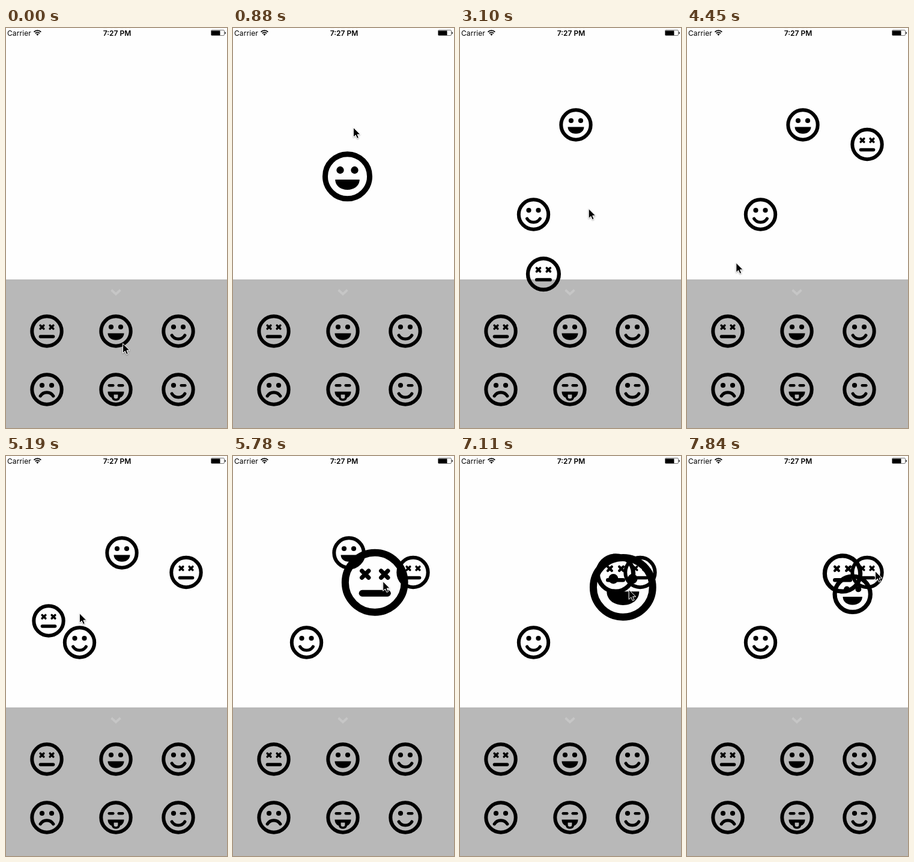
An HTML page for the animation above (8000 ms loop, 368 by 665 pixels).

```html
<!DOCTYPE html>
<html lang="en">
<head>
<meta charset="utf-8">
<title>Face tray</title>
<style>
  html, body { margin: 0; width: 100%; height: 100%; overflow: hidden; background: #fefefe; }
  svg { display: block; width: 368px; height: 665px; }
  text { font: 12px Inter, Roboto, sans-serif; }
  .line { fill: none; stroke: #000; stroke-linecap: round; stroke-linejoin: round; }
</style>
</head>
<body>
<svg viewBox="0 0 368 665">
  <defs>
    <circle id="ring" class="line" r="24.7" stroke-width="6"/>
    <circle id="dot" r="4.1" cy="-7"/>
    <path id="dash" class="line" d="M-3.3-6.8h6.6" stroke-width="4.4"/>
    <path id="cross" class="line" d="M-2.8-9.6l5.6 5.6m0-5.6l-5.6 5.6" stroke-width="3.6"/>
    <path id="curve" class="line" d="M-10.8 7C-6 15 6 15 10.8 7" stroke-width="5.2"/>
    <g id="dots"><use href="#dot" x="-8"/><use href="#dot" x="8"/></g>

    <g id="dead">
      <use href="#ring"/><use href="#cross" x="-8"/><use href="#cross" x="8"/>
      <path class="line" d="M-10.6 9h21.2" stroke-width="5.4"/>
    </g>
    <g id="grin">
      <use href="#ring"/><use href="#dots"/>
      <path d="M-13.5 3.5h27c0 6.5-5.5 11.3-13.5 11.3s-13.5-4.8-13.5-11.3z"/>
    </g>
    <g id="smile"><use href="#ring"/><use href="#dots"/><use href="#curve"/></g>
    <g id="sad">
      <use href="#ring"/><use href="#dots"/>
      <use href="#curve" transform="translate(0 17.8) scale(1 -1)"/>
    </g>
    <g id="tongue">
      <use href="#ring"/><use href="#dash" x="-8"/><use href="#dash" x="8"/>
      <path fill-rule="evenodd" d="M-13.5 3.5h27c0 5-2.5 8.5-6.5 10.3c-.6 3-3.2 5-7 5s-6.4-2-7-5c-4-1.8-6.5-5.3-6.5-10.3zM-3.4 8.5v3.5a3.4 3.2 0 0 0 6.8 0v-3.5z"/>
    </g>
    <g id="wink">
      <use href="#ring"/><use href="#dot" x="-8"/><use href="#dash" x="8"/><use href="#curve"/>
    </g>
    <filter id="shade" x="-50%" y="-50%" width="200%" height="200%">
      <feDropShadow dx="0" dy="1" stdDeviation="1" flood-opacity=".4"/>
    </filter>
  </defs>

  <rect width="368" height="665" fill="#fefefe"/>
  <text x="2" y="12.5" letter-spacing=".1">Carrier</text>
  <path class="line" style="stroke-linecap:butt" stroke-width="1.9"
        d="M46.5 6.6a8.3 8.3 0 0 1 11.8 0M48.7 8.9a5.2 5.2 0 0 1 7.4 0"/>
  <path d="M52.4 12.7l-2.1-2.2a3 3 0 0 1 4.2 0z"/>
  <text x="185" y="12.5" text-anchor="middle" style="font-weight:600">7:27 PM</text>
  <rect x="341.5" y="3.5" width="22" height="9" rx="1.5" fill="none" stroke="#777"/>
  <rect x="342" y="4.5" width="14.5" height="7.5"/>
  <path d="M364.5 6.3q1.5.4 1.5 1.9t-1.5 1.9z"/>

  <rect y="418" width="368" height="247" fill="#b8b8b8"/>
  <path d="M175.5 435.5l7.5 7 7.5-7" fill="none" stroke="#c6c6c6" stroke-width="3.8"/>
  <g id="faces"></g>
  <path id="cursor" d="M.5 .5v16l3.7-3.5 2.5 5.6 2.7-1.1-2.4-5.5h5z"
        stroke="#fff" filter="url(#shade)"/>
</svg>
<script>
const LOOP = 8000, TICK = 148.1, LAST = 53;
const rest = [194, 524], park = [313, 191];
const $ = id => document.getElementById(id);
const add = (a, b, k = 1) => a.map((v, axis) => v + b[axis] * k);

const tray = {};
['dead', 'grin', 'smile', 'sad', 'tongue', 'wink'].forEach((kind, n) => {
  tray[kind] = [[68, 183, 287][n % 3], n < 3 ? 504 : 601];
});
const kinds = ['grin', 'smile', 'dead', 'dead'];

// press and drop are ticks, grab is the pointer's offset on the face,
// to is where the face lands; ease and bow shape the hand's path.
const drags = [
  { sprite: 0, press: 2, drop: 6, grab: [7, 4], to: [193, 161], ease: 1, bow: 0 },
  { sprite: 1, press: 12, drop: 15, grab: [10, 6], to: [122.5, 310], ease: .6, bow: 0 },
  { sprite: 2, press: 19, drop: 22, grab: [0, -9], to: [300, 193.5], ease: .9, bow: 0 },
  { sprite: 3, press: 29, drop: 31, grab: [0, -11], to: [71, 274], ease: .86, bow: 12 },
  { sprite: 3, press: 34, drop: 40, grab: [-4, 7], to: [259, 195.5], ease: 1.85, bow: 5.6 },
  { sprite: 0, press: 45, drop: 48, grab: [5, -8], to: [275.7, 229.8], ease: 2.1, bow: -7 }
];

// The first drag of a sprite lifts it from the tray, a later one from where it lies.
drags.forEach((drag, n) => {
  const before = drags.slice(0, n).findLast(d => d.sprite === drag.sprite);
  drag.home = before ? before.to : tray[kinds[drag.sprite]];
  drag.peak = before ? 2 : 1.5;
  drag.size = before ? 1.2 : 1;
  drag.settle = drag.drop + 2;
});

function dragPos({ press, drop, home, to, ease, bow }, tick) {
  const k = Math.min(1, Math.max(0, (tick - press) / (drop - press)));
  const [dx, dy] = add(to, home, -1);
  const side = bow * Math.sin(Math.PI * k) / Math.hypot(dx, dy);
  return add(add(home, [dx, dy], 1 - (1 - k) ** ease), [-dy, dx], side);
}

function scaleAt(tick, { press, settle, peak, size }) {
  if (tick >= settle) return size;
  if (tick === press + 2) return 1.05;
  return tick === settle - 1 ? peak * .92 : peak;
}

// Follows the current drag, then glides to the next press.
function pointerAt(tick) {
  const now = drags.findLast(d => d.press <= tick);
  if (now && tick < now.settle) return add(dragPos(now, tick), now.grab);
  const next = drags.find(d => d.press > tick);
  const from = now ? add(now.to, now.grab) : rest;
  const to = next ? add(next.home, next.grab) : park;
  const start = now ? now.settle : 0, end = next ? next.press : LAST;
  const k = (tick - start) / (end - start);
  return add(from, add(to, from, -1), k * k * (3 - 2 * k));
}

function addFace(kind) {
  const face = document.createElementNS('http://www.w3.org/2000/svg', 'use');
  face.setAttribute('href', '#' + kind);
  return $('faces').appendChild(face);
}

function place(el, [x, y], scale = 1) {
  el.setAttribute('transform', `translate(${x} ${y}) scale(${scale})`);
}

for (const kind in tray) place(addFace(kind), tray[kind]);
const sprites = kinds.map(addFace);

function draw(tick) {
  sprites.forEach((el, n) => {
    const drag = drags.findLast(d => d.sprite === n && d.press + 1 < tick);
    el.style.display = drag ? '' : 'none';
    // faces trail the pointer by one tick
    if (drag) place(el, dragPos(drag, tick - 1), scaleAt(tick, drag));
  });
  place($('cursor'), pointerAt(tick));
}

const start = performance.now();
function run() {
  const time = (performance.now() - start) % LOOP;
  draw(Math.min(LAST, Math.floor((time + 14) / TICK)));
  requestAnimationFrame(run);
}
run();
</script>
</body>
</html>
```
